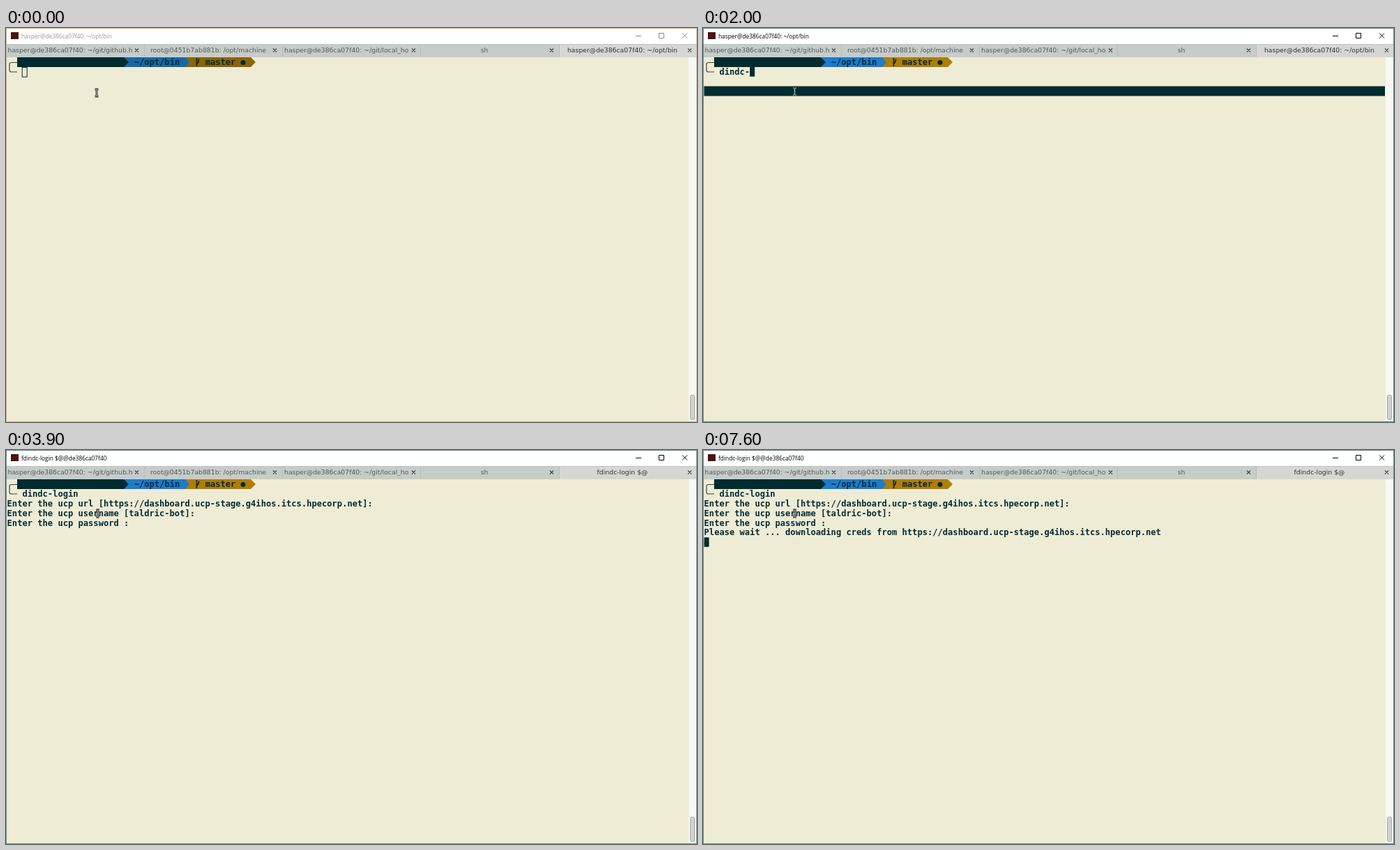
An HTML page that plays this animation: 991 px wide and 565 px high, repeating every 8000 ms.

```html
<!DOCTYPE html>
<html lang="en">
<head>
<meta charset="utf-8">
<title>Terminal login</title>
<style>
  html, body { margin: 0; width: 100%; height: 100%; overflow: hidden; background: #efecd5; }
  svg { display: block; }
  text { white-space: pre; }
  .mono { font: bold 12.1px "DejaVu Sans Mono", monospace; fill: #002b36; }
  .tab { font: 9.3px "DejaVu Sans", sans-serif; fill: #555a58; }
  .title { font: 8.35px "Open Sans", "Noto Sans", sans-serif; }
  .mid { text-anchor: middle; }
</style>
</head>
<body>
<svg id="stage" width="991" height="565" viewBox="0 0 991 565"></svg>
<script>
const LOOP = 8000;
const INK = "#002b30";
const COL = 7.284, ROW = 13.85, LEFT = 1.6;
const HOST = "de386ca07f40";
const SHELL = `hasper@${HOST}: ~/`;
const URL_TEXT = "https://dashboard.ucp-stage.g4ihos.itcs.hpecorp.net";
const COMMAND = "dindc-login";

const stage = document.getElementById("stage");

function add(tag, attrs, content = "", parent = stage) {
  const el = document.createElementNS("http://www.w3.org/2000/svg", tag);
  for (const key in attrs) el.setAttribute(key, attrs[key]);
  el.textContent = content;
  parent.appendChild(el);
  return el;
}
const rect = (x, y, width, height, fill, more) => add("rect", { x, y, width, height, fill, ...more });
const line = (d, stroke, width = 1) => add("path", { d, stroke, fill: "none", "stroke-width": width });
const label = (cls, x, y, content, parent) => add("text", { class: cls, x, y }, content, parent);
const cross = (x, y, r) => `M${x - r} ${y - r}l${2 * r} ${2 * r}m0 ${-2 * r}l${-2 * r} ${2 * r}`;
const colX = col => LEFT + col * COL;
const mono = (col, row, content = "") => label("mono", colX(col), 53.2 + row * ROW, content);
const show = (el, on) => el.setAttribute("visibility", on ? "visible" : "hidden");

// Title bar
rect(0, 0, 991, 565, "#efecd5");
rect(0, 0, 991, 23, "#ffffff");
rect(7, 6, 11, 10, "#4a1410");
const title = label("title", 22, 14.7, "");
const buttons = line(`M903 11.5h8M936.5 7.5h7v7h-7z${cross(973.5, 11, 3.5)}`, "#000");

// Tabs
rect(0, 23, 991, 19, "#c6ccc9");
rect(794, 23, 197, 19, "#d6d7d4");
line("M0 23.5H991", "#bcc3c0");
line("M198.5 24V41M396.5 24V41M594.5 24V41M793.5 24V41", "#b6bdba");

function clippedTab(x, width, content) {
  const box = add("svg", { x, y: 23, width, height: 18 });
  label("tab", 0, 12.2, content, box);
}
clippedTab(2.5, 178.5, SHELL + "git/github.hpe");
label("tab mid", 290, 35.2, "root@0451b7ab881b: /opt/machine");
clippedTab(399, 178, SHELL + "git/local_ho");
label("tab mid", 686, 35.2, "sh");
const activeTab = label("tab mid", 884, 35.2, "");
activeTab.style.fill = "#333";
line([187.5, 385.5, 584.5, 782.5, 980.5].map(x => cross(x, 32, 2.5)).join(""), "#444", 1.2);

// Scrollbar
rect(979, 42, 11, 522, "#f8f8f4");
rect(981.5, 526.5, 6, 35, "#d2d3d0", { rx: 2, stroke: "#a5a8a5" });

// Prompt
line("M16 49.5H8Q5 49.5 5 52V60.5Q5 63 8 63H16", "#33484c", 1.2);
const branch = add("path", { d: "M257 42H351L358 49L351 56H257z" });
const folder = add("path", { d: "M169 42H257L263 49L257 56H169z" });
add("path", { d: "M16 42H169L176 49L169 56H16z", fill: INK });
mono(25, 0, "~/opt/bin");
line("M273.5 43V55M273.5 51Q276.5 50 276.5 44.5", INK, 1.7);
mono(39, 0, "master");
add("circle", { cx: 340, cy: 49.5, r: 3.5, fill: INK });

// Output
const typed = mono(3, 1);
const output = [
  [2600, mono(0, 2, `Enter the ucp url [${URL_TEXT}]: `)],
  [3200, mono(0, 3, "Enter the ucp username [taldric-bot]: ")],
  [3300, mono(0, 4, "Enter the ucp password : ")],
  [7200, mono(0, 5, `Please wait ... downloading creds from ${URL_TEXT}`)]
];
const bar = rect(1.5, 83.5, 976.5, 14, INK);
const caret = rect(0, 0, 7, 13.6, INK);

// Pointer
const pointer = add("g", {});
const beam = "M-2.5 -5H-.8L0 -4.2L.8 -5H2.5M0 -4.2V4.2M-2.5 5H-.8L0 4.2L.8 5H2.5";
const beamEdge = add("path", { d: beam, fill: "none", stroke: "#222b2b", "stroke-width": 2.8 }, "", pointer);
const beamCore = add("path", { d: beam, fill: "none", "stroke-width": 0.9 }, "", pointer);

const frame = rect(0.5, 0.5, 990, 564, "none");

// Caret steps: time, mode, column, row (column null follows the typing)
const caretSteps = [
  [0, "hollow", null, 1],
  [300, "solid", null, 1],
  [1000, "off", null, 1],
  [1500, "solid", null, 1],
  [2600, "solid", 73, 2],
  [3200, "solid", 37, 3],
  [3300, "solid", 25, 4],
  [3900, "off", 25, 4],
  [7200, "solid", 0, 6]
];

function typedCount(t) {
  if (t < 1700) return 0;
  const n = t < 2000 ? 2 + Math.floor((t - 1700) / 100) : 6 + Math.floor((t - 2000) / 100);
  return Math.min(COMMAND.length, n);
}

function drawCaret(t, count) {
  const [, mode, col, row] = caretSteps.filter(s => s[0] <= t).pop();
  const hollow = mode === "hollow";
  show(caret, mode !== "off");
  caret.setAttribute("x", colX(col ?? 3 + count) - (hollow ? 0.3 : 0));
  caret.setAttribute("y", 42.2 + row * ROW + (hollow ? 0.5 : 0));
  caret.setAttribute("fill", hollow ? "none" : INK);
  caret.setAttribute("stroke", hollow ? INK : "none");
}

function draw(t) {
  const focused = t >= 300;
  const running = t >= 2600;
  const barOn = focused && t < 3200;
  const count = typedCount(t);

  title.textContent = running ? `fdindc-login $@@${HOST}` : SHELL + "opt/bin";
  title.setAttribute("fill", focused ? "#000" : "#999");
  buttons.setAttribute("stroke", focused ? "#000" : "#8c8c8c");
  activeTab.textContent = running ? "fdindc-login $@" : SHELL + "opt/bin";
  frame.setAttribute("stroke", focused ? "#5b8f82" : "#c4b688");
  folder.setAttribute("fill", focused ? "#1d7ccb" : "#1669a5");
  branch.setAttribute("fill", focused ? "#b07d05" : "#8a6408");

  typed.textContent = COMMAND.slice(0, count);
  for (const [start, el] of output) show(el, t >= start);
  show(bar, barOn);
  drawCaret(t, count);

  pointer.setAttribute("transform", focused ? "translate(131.5 91)" : "translate(130 93)");
  show(beamEdge, !barOn);
  beamCore.setAttribute("stroke", barOn ? "#e8e6d2" : "#d8d6c2");
}

const begin = performance.now();
function tick() {
  draw((performance.now() - begin) % LOOP);
  requestAnimationFrame(tick);
}
tick();
</script>
</body>
</html>
```
